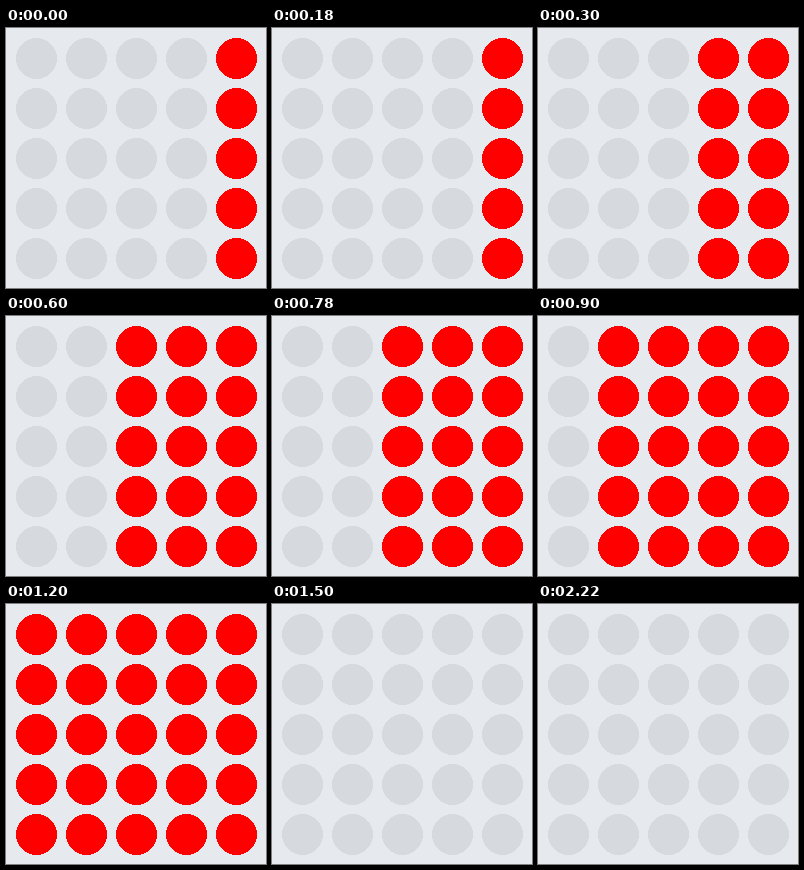
These frames come from a looping animation (260 px wide and 260 px high, 2700 ms). An HTML page:

```html
<!DOCTYPE html>
<html lang="en">
<head>
<meta charset="utf-8">
<title>Dot columns</title>
<style>
  html, body { margin: 0; width: 100%; height: 100%; overflow: hidden; background: #e6e9ee; }
  svg { display: block; width: 260px; height: 260px; }
</style>
</head>
<body>
<svg id="stage" viewBox="0 0 260 260" shape-rendering="crispEdges"></svg>
<script>
  const NS = "http://www.w3.org/2000/svg";
  const SIZE = 5, PITCH = 50, FIRST = 30.5, RADIUS = 20.5;
  const STEP = 300, LOOP = 2700;
  const OFF = "#d6dade", ON = "#ff0000";
  const stage = document.getElementById("stage");

  function add(tag, attrs, parent) {
    const node = document.createElementNS(NS, tag);
    for (const key in attrs) node.setAttribute(key, attrs[key]);
    return parent.appendChild(node);
  }

  const columns = Array.from({ length: SIZE }, (_, col) => {
    const group = add("g", { fill: OFF }, stage);
    for (let row = 0; row < SIZE; row++) {
      add("circle", { cx: FIRST + col * PITCH, cy: FIRST + row * PITCH, r: RADIUS }, group);
    }
    return group;
  });

  // Columns light up from right to left, then all go dark for a pause.
  function draw(time) {
    const step = Math.floor((time % LOOP) / STEP);
    const lit = step < SIZE ? step + 1 : 0;
    columns.forEach((group, col) => {
      group.setAttribute("fill", col >= SIZE - lit ? ON : OFF);
    });
  }

  const start = performance.now();
  function tick() {
    draw(performance.now() - start);
    requestAnimationFrame(tick);
  }
  tick();
</script>
</body>
</html>
```
